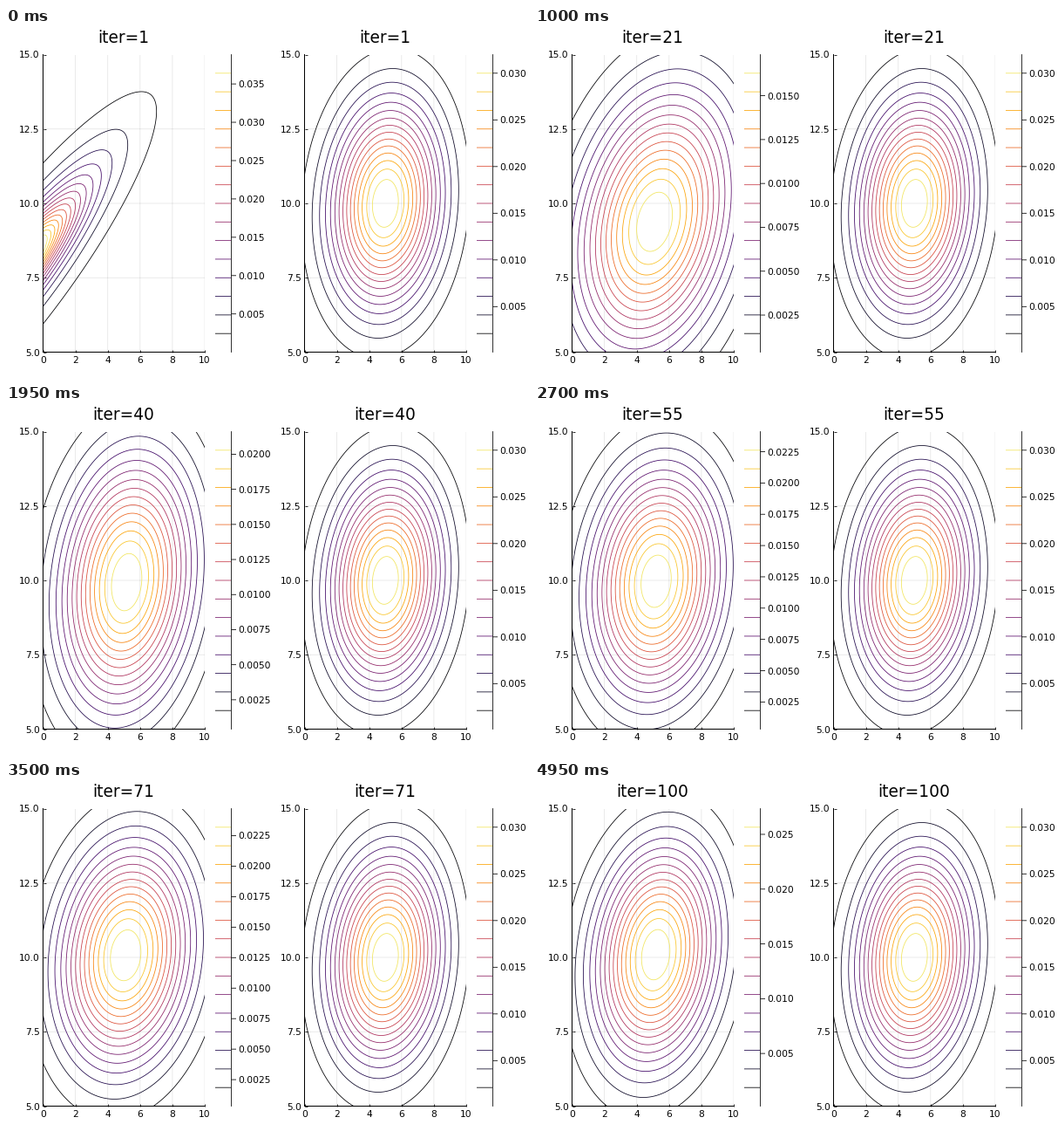
Recreate the animation shown at these times as a matplotlib script. Size 600 by 400 pixels, loop 5 s.

```python
import numpy as np
import matplotlib.pyplot as plt
from matplotlib.animation import FuncAnimation
from matplotlib.collections import LineCollection

W, H, DPI = 600, 400, 100
FRAMES, INTERVAL = 100, 50
TOP, BOTTOM = 30.5, 371.5
LEVELS = 15
PX = 72 / DPI  # one pixel in points
LINE = 0.8 * PX
SMALL, LARGE = 10.67 * PX, 18.67 * PX

plt.rcParams["font.family"] = "DejaVu Sans"
plt.rcParams["path.snap"] = False
COLORS = plt.get_cmap("inferno")(np.linspace(0, 14 / 15, LEVELS))
CIRCLE = np.array([np.cos(np.linspace(0, 2 * np.pi, 241)),
                   np.sin(np.linspace(0, 2 * np.pi, 241))])
GX, GY = np.meshgrid(np.linspace(0, 10, 101), np.linspace(5, 15, 101))

# Posterior predictive at a few sample counts: n, mean x, mean y, sd x, sd y, correlation
KNOTS = np.array([
    [1, -1.39, 7.77, 3.245, 2.310, 0.889],
    [21, 5.10, 9.38, 3.246, 2.920, 0.250],
    [40, 5.17, 9.94, 2.700, 2.760, 0.155],
    [55, 5.20, 9.97, 2.660, 2.500, 0.120],
    [71, 5.11, 10.07, 2.680, 2.423, 0.130],
    [85, 5.11, 10.11, 2.590, 2.374, 0.150],
    [100, 5.175, 10.09, 2.475, 2.380, 0.155],
])


def knot_stats(n, mx, my, sx, sy, rho):
    """Running sums (first and second moments) behind a predictive density."""
    k = n + 1
    c = rho * sx * sy
    scatter = np.array([sx * sx, c, sy * sy]) * k * k / (k + 1)
    return np.concatenate([[k * mx, k * my],
                           scatter + k * np.array([mx * mx, mx * my, my * my])])


STATS = np.array([knot_stats(*row) for row in KNOTS])


def predictive(n):
    """Mean, scale matrix and degrees of freedom of the Student t after n samples."""
    k = n + 1
    sx, sy, sxx, sxy, syy = (np.interp(n, KNOTS[:, 0], s) for s in STATS.T)
    mean = np.array([sx, sy]) / k
    scatter = np.array([[sxx, sxy], [sxy, syy]]) - k * np.outer(mean, mean)
    return mean, scatter * (k + 1) / k**2, k


def contours(mean, cov, dof):
    """Contour ellipses plus the density range over the visible area."""
    inv = np.linalg.inv(cov)
    dx, dy = GX - mean[0], GY - mean[1]
    q = inv[0, 0] * dx**2 + 2 * inv[0, 1] * dx * dy + inv[1, 1] * dy**2
    peak = 1 / (2 * np.pi * np.sqrt(np.linalg.det(cov)))
    z = peak * (1 + q / dof) ** (-(dof + 2) / 2)
    lo, hi = z.min(), z.max()
    levels = lo + (hi - lo) * np.arange(1, LEVELS + 1) / (LEVELS + 1)
    radii = np.sqrt(dof * ((peak / levels) ** (2 / (dof + 2)) - 1))
    unit = np.linalg.cholesky(cov) @ CIRCLE
    return [(mean[:, None] + r * unit).T for r in radii], lo, hi


def bar_ticks(hi):
    for step, digits in ((0.01, 2), (0.005, 3), (0.0025, 4), (0.002, 3), (0.001, 3)):
        count = int(hi / step + 1e-9)
        if count >= 5:
            break
    return step * np.arange(1, count + 1), digits


class Panel:
    def __init__(self, fig, page, left):
        self.left = left
        ax = fig.add_axes([left / W, 1 - BOTTOM / H, 185.5 / W, (BOTTOM - TOP) / H])
        ax.set(xlim=(0, 10), ylim=(5, 15), xticks=range(0, 11, 2),
               yticks=np.arange(5, 15.1, 2.5), facecolor="none")
        ax.yaxis.set_major_formatter("{x:.1f}")
        ax.spines[["top", "right"]].set_visible(False)
        ax.spines[["left", "bottom"]].set_linewidth(PX)
        ax.tick_params(direction="in", length=2.8 * PX, width=LINE, labelsize=SMALL)
        ax.tick_params(axis="x", pad=4.5 * PX)
        ax.tick_params(axis="y", pad=3.7 * PX)
        ax.grid(color="black", alpha=0.1, linewidth=LINE)
        ax.set_axisbelow(True)
        self.rings = LineCollection([], colors=COLORS, linewidths=LINE, zorder=2)
        ax.add_collection(self.rings, autolim=False)

        self.title = page.text(left + 92.5, 17, "", fontsize=LARGE, ha="center")
        rows = BOTTOM - (BOTTOM - TOP) * np.arange(1, LEVELS + 1) / (LEVELS + 1)
        page.add_collection(LineCollection(
            [[(left + 197.5, y), (left + 215.5, y)] for y in rows],
            colors=COLORS, linewidths=LINE), autolim=False)
        page.plot([left + 216] * 2, [TOP, BOTTOM], color="black", lw=LINE)
        self.ticks = LineCollection([], colors="black", linewidths=LINE)
        page.add_collection(self.ticks, autolim=False)
        self.labels = [page.text(left + 223.5, 0, "", fontsize=SMALL,
                                 va="center_baseline") for _ in range(12)]

    def show(self, n, mean, cov, dof):
        rings, lo, hi = contours(mean, cov, dof)
        self.rings.set_segments(rings)
        self.title.set_text(f"iter={n}")
        values, digits = bar_ticks(hi)
        ys = BOTTOM - (values - lo) / (hi - lo) * (BOTTOM - TOP)
        x = self.left + 216
        self.ticks.set_segments([[(x, y), (x + 5.5, y)] for y in ys])
        for label in self.labels:
            label.set_text("")
        for label, value, y in zip(self.labels, values, ys):
            label.set_text(f"{value:.{digits}f}")
            label.set_y(y)


fig = plt.figure(figsize=(W / DPI, H / DPI), dpi=DPI, facecolor="white")
page = fig.add_axes([0, 0, 1, 1])
page.set(xlim=(0, W), ylim=(H, 0))
page.axis("off")
page.autoscale(False)
estimate, truth = Panel(fig, page, 42.5), Panel(fig, page, 342.5)
TRUE_MEAN = np.array([5.0, 10.0])
TRUE_COV = np.array([[5.0, 0.5], [0.5, 5.0]])
NORMAL = 1e6  # so many degrees of freedom that the t is a normal


def draw(frame):
    n = frame + 1
    estimate.show(n, *predictive(n))
    truth.show(n, TRUE_MEAN, TRUE_COV, NORMAL)
    return []


anim = FuncAnimation(fig, draw, frames=FRAMES, interval=INTERVAL,
                     init_func=lambda: draw(0), repeat=True, repeat_delay=0)
plt.show()
```
